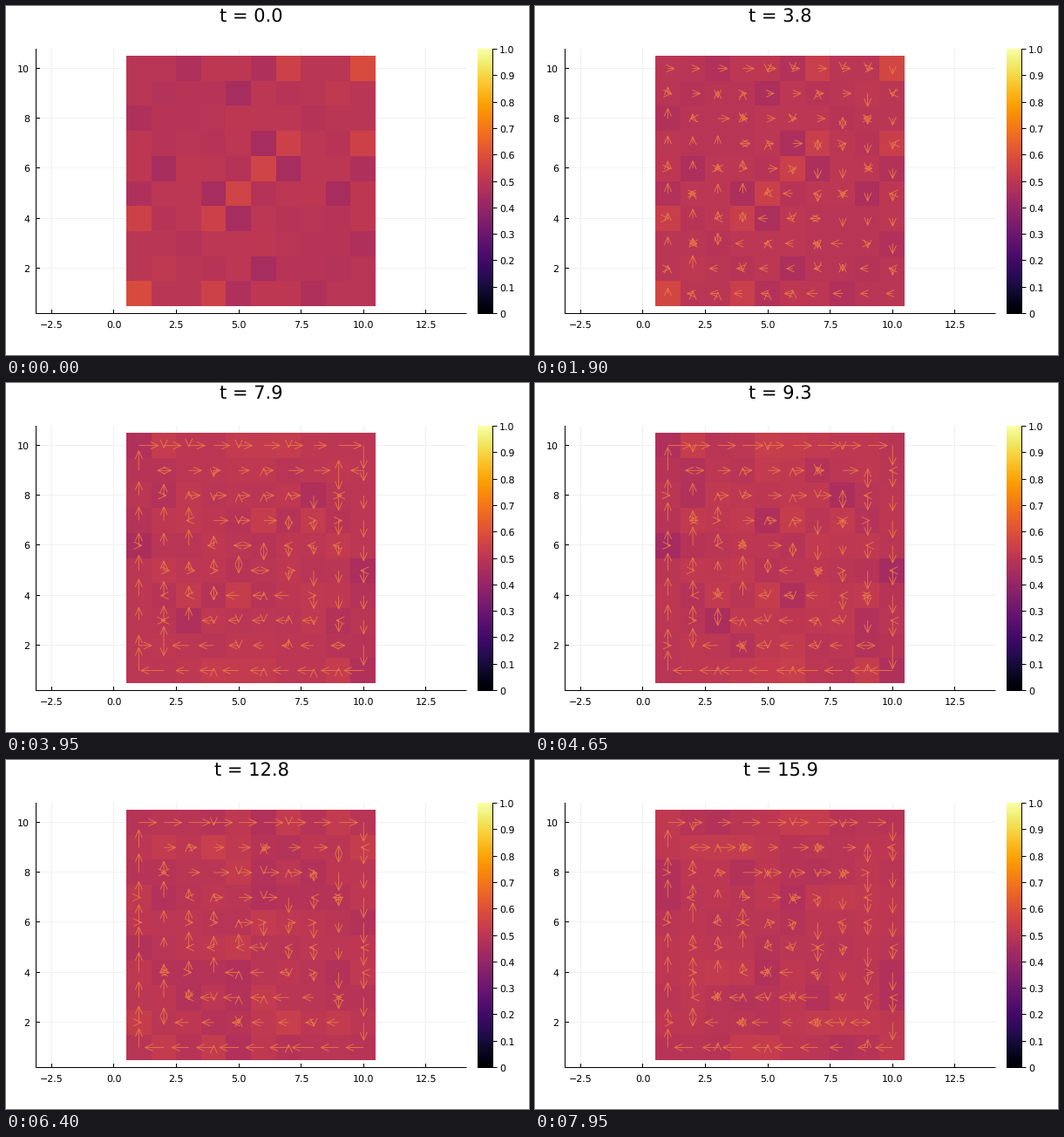
Recreate the animation shown at these times as a matplotlib script. Size 600x400 px, loop 8 s.

```python
import numpy as np
import matplotlib.pyplot as plt
from matplotlib.animation import FuncAnimation

W, H, DPI = 600, 400, 100
FRAMES, STEP_MS, DT = 160, 50, 0.1
N = 10                       # sites per side
UNIT = 28.656                # pixels per lattice spacing
X0, Y0 = 123.74, 358.16      # pixel position of the data point (0, 0)
LEFT, RIGHT, TOP, BOTTOM = 34.5, 528.5, 49, 352.5
PX = 72 / DPI                # one pixel in points
ARROW, GRID = "#E36F47", "#f0f0f0"
HEAD_LEN, HEAD_HALF = 9.2, 4.1

rng = np.random.default_rng(7)


def px(x):
    return X0 + UNIT * x


def py(y):
    return Y0 - UNIT * y


def even(a):
    """Make a field symmetric under a half turn."""
    return (a + a[::-1, ::-1]) / np.sqrt(2)


def blend(fields, step, t):
    """Ease from one field to the next, each step time units apart."""
    i, f = divmod(t / step, 1)
    a, b = fields[int(i)], fields[int(i) + 1]
    return a + (b - a) * f * f * (3 - 2 * f)


# ---- site density: a symmetric start that drifts into seeded noise --------

PEAKS = [(1, 1, .085), (4, 1, .05), (5, 5, .055), (4, 4, .045),
         (5, 9, -.05), (6, 7, -.05), (1, 8, -.035), (1, 5, -.03)]

start = even(rng.normal(0, 0.008, (N, N)))
start = (start + start.T) / np.sqrt(2)
for x, y, v in PEAKS:
    for a, b in ((x, y), (y, x)):
        start[b - 1, a - 1] = start[N - b, N - a] = v

DRIFT = 2.2
DENSITY = [start, start, 0.7 * start]
DENSITY += [even(rng.normal(0.003, 0.018, (N, N))) for _ in range(7)]


# ---- bond currents from a stream function on the plaquettes ---------------

edge = np.minimum(np.arange(N + 1), N - np.arange(N + 1))
LEVEL = np.minimum.outer(edge, edge)
INSIDE = LEVEL > 0

PERIOD = 2
RIPPLES = [even(rng.normal(0, 1, (N + 1, N + 1))) * INSIDE for _ in range(10)]
RIPPLES[1] = RIPPLES[0]


def arrows(t):
    """Pixel polylines of all arrows, separated by NaN."""
    outer = np.interp(t, [0, 10.4, 16], [0, .81, .64])
    inner = 0.5 * np.tanh(t / 6)
    amp = 0.11 * (1 - np.exp(-t / 4))
    psi = (outer + inner * (LEVEL - 1)) * INSIDE
    psi = psi + amp * blend(RIPPLES, PERIOD, t)
    across = psi[:-1, 1:-1] - psi[1:, 1:-1]
    upward = psi[1:-1, 1:] - psi[1:-1, :-1]
    xs, ys = [], []
    for bonds, dx, dy in ((across, 1, 0), (upward, 0, 1)):
        for (r, c), j in np.ndenumerate(bonds):
            if abs(j) <= amp / 2:
                continue
            # each arrow leaves the site that the current flows out of
            s = np.sign(j)
            x = px(c + 1 + (dx if s < 0 else 0))
            y = py(r + 1 + (dy if s < 0 else 0))
            ux, uy = s * dx, -s * dy
            tx, ty = x + ux * abs(j) * UNIT, y + uy * abs(j) * UNIT
            bx, by = tx - HEAD_LEN * ux, ty - HEAD_LEN * uy
            ox, oy = -uy * HEAD_HALF, ux * HEAD_HALF
            xs += [x, tx, np.nan, bx + ox, tx, bx - ox, np.nan]
            ys += [y, ty, np.nan, by + oy, ty, by - oy, np.nan]
    return xs, ys


# ---- stage ----------------------------------------------------------------

plt.rcParams.update({"font.family": "DejaVu Sans", "text.hinting": "none",
                     "text.hinting_factor": 1})
fig = plt.figure(figsize=(W / DPI, H / DPI), dpi=DPI, facecolor="white")
ax = fig.add_axes([0, 0, 1, 1])
ax.axis("off")


def crisp(v):
    """Centre of the pixel that holds v."""
    return np.floor(v) + 0.5


def line(xs, ys, color="black", z=5):
    ax.plot(xs, ys, color=color, lw=PX, zorder=z, snap=False,
            solid_capstyle="butt")


def label(x, y, s, ha, size=11.4):
    return ax.text(x, y, s, ha=ha, va="baseline", fontsize=size * PX,
                   color="black")


def image(data, x0, x1, y0, y1, z):
    return ax.imshow(data, cmap="inferno", vmin=0, vmax=1, origin="lower",
                     extent=(x0, x1, y0, y1), aspect="auto",
                     interpolation="nearest", zorder=z)


for v in np.arange(-2.5, 13, 2.5):
    x = crisp(px(v))
    line([x, x], [TOP, BOTTOM], GRID, 1)
    line([x, x], [BOTTOM, BOTTOM - 4.5])
    label(px(v), 369, f"{v:.1f}".replace("-", "\u2212"), "center")
for v in range(2, N + 1, 2):
    y = crisp(py(v) - 0.5)
    line([LEFT, RIGHT], [y, y], GRID, 1)
    line([LEFT, LEFT + 4.5], [y, y])
    label(27, y + 4.5, str(v), "right")
line([LEFT, LEFT], [TOP, BOTTOM + 0.5])
line([LEFT, RIGHT], [BOTTOM, BOTTOM])

image(np.linspace(0, 1, 256)[:, None], 541, 558, 353, TOP, 2)
line([558.5, 558.5], [TOP, BOTTOM + 0.5])
for k in range(11):
    y = crisp(BOTTOM - 30.3 * k)
    line([558.5, 563.5], [y, y])
    label(566, y + 4.5, f"{k / 10:.1f}" if k else "0", "left")

heat = image(start + 0.5, 138, 424, 344, 57, 3)
flow, = ax.plot([], [], color=ARROW, lw=PX, zorder=4,
                solid_capstyle="butt", solid_joinstyle="miter")
title = label(281.5, 18, "", "center", 20.6)
ax.set_xlim(0, W)
ax.set_ylim(H, 0)


def draw(n):
    t = n * DT
    heat.set_data(0.5 + blend(DENSITY, DRIFT, t))
    flow.set_data(*arrows(t))
    title.set_text(f"t = {t:.1f}")
    return heat, flow, title


anim = FuncAnimation(fig, draw, frames=FRAMES, interval=STEP_MS,
                     repeat=True, repeat_delay=0)
plt.show()
```
